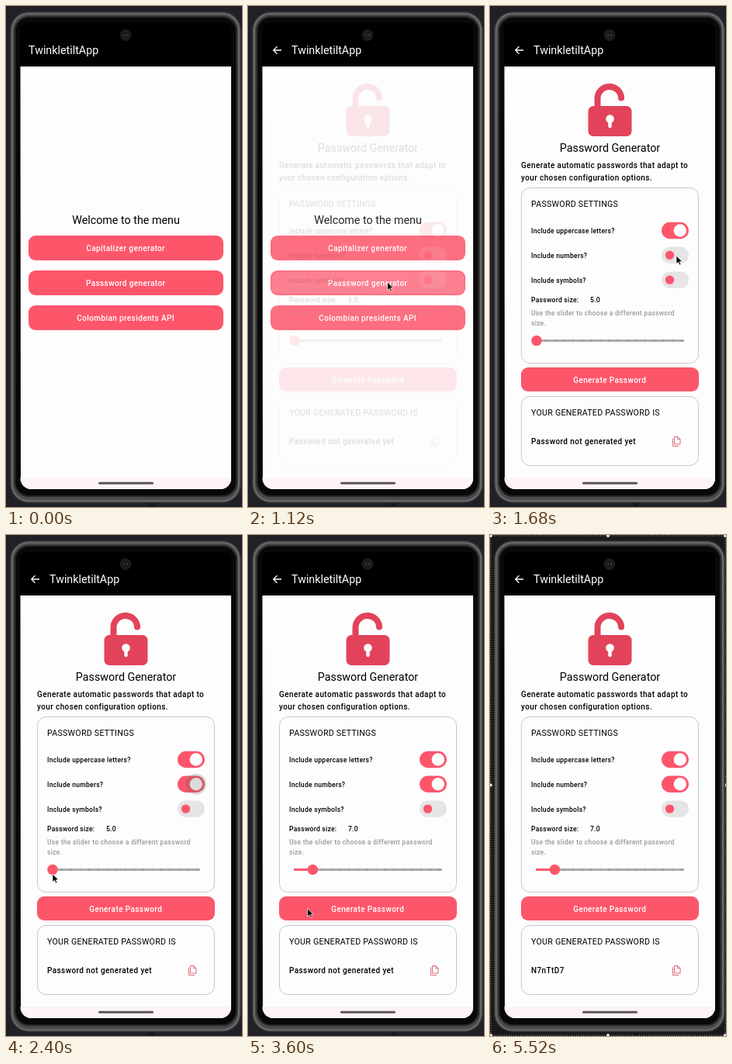
Recreate the animation shown at these times as an HTML page. Size 304 by 646 pixels, loop 5920 ms.

```html
<!DOCTYPE html>
<html lang="en">
<head>
<meta charset="utf-8">
<style>
html, body { margin: 0; width: 100%; height: 100%; overflow: hidden; background: #202027; }
svg { display: block; width: 304px; height: 646px; font-family: Roboto, sans-serif; }
.big { font-size: 14.3px; }
.body { font-size: 10px; font-weight: 500; letter-spacing: .39px; }
.caps { font-size: 10.7px; letter-spacing: .23px; }
.small { font-size: 8.6px; font-weight: 500; letter-spacing: .24px; }
.mid { text-anchor: middle; }
.white { fill: #fff; }
.accent { fill: #fd566b; }
.lock { fill: #e2435a; }
.card { fill: none; stroke: #777; stroke-width: .4; }
</style>
</head>
<body>
<svg viewBox="0 0 304 646">
  <rect width="304" height="646" fill="#202027"/>
  <g id="select">
    <rect width="304" height="646" fill="#191919"/>
    <rect x="1" y="1" width="302" height="644" fill="none" stroke="#555" stroke-width="2" stroke-dasharray="1 2"/>
    <g id="handles" fill="#e4e4e4"></g>
  </g>

  <!-- phone -->
  <path d="M7 150v7M301 150v7M184 643h7" stroke="#17171a" stroke-width="4"/>
  <rect x="5.5" y="7.5" width="297" height="633" rx="24" fill="#4a4a4a" stroke="#303030"/>
  <rect x="8" y="10" width="292" height="628" rx="21" fill="none" stroke="#707070" stroke-width="1.5"/>
  <rect x="11.5" y="14" width="285.5" height="618" rx="18" fill="#080808" stroke="#262626" stroke-width="2"/>
  <rect x="18" y="22" width="272" height="64" rx="8"/>
  <path d="M18.5 78H290V609a14 14 0 0 1-14 14H32.500a14 14 0 0 1-13.500-14Z" fill="#fdfdfd"/>
  <path d="M18.500 608H290V609a14 14 0 0 1-14 14H32.500a14 14 0 0 1-14-14Z" fill="#fdf3f9"/>
  <rect x="119" y="613.7" width="71" height="3" rx="1.5" fill="#5b585b"/>
  <circle cx="154" cy="37.5" r="7.5" fill="#1b1b1c"/>
  <path d="M151.5 37.5h1.5M155.5 37.5h1.5" stroke="#555" stroke-width="1.5"/>
  <text id="title" class="big white" y="62">TwinkletiltApp</text>
  <path id="back" d="M43 57H33M37.5 52.3L32.8 57L37.5 61.7" fill="none" stroke="#fff" stroke-width="1.3"/>

  <g id="menu">
    <text class="big mid" x="154.5" y="281">Welcome to the menu</text>
  </g>

  <g id="form">
    <path d="M138.5 133V120a15.3 15.3 0 0 1 30.6-1.500" fill="none" stroke="#e2435a" stroke-width="8" stroke-linecap="round"/>
    <rect class="lock" x="126.5" y="129" width="56" height="39" rx="6.500"/>
    <circle class="white" cx="154.5" cy="145.500" r="5.3"/>
    <path d="M154.5 147v8" stroke="#fff" stroke-width="4.5" stroke-linecap="round"/>
    <text class="big mid" x="154.5" y="187.5">Password Generator</text>
    <text class="body" x="40" y="209">Generate automatic passwords that adapt to</text>
    <text class="body" x="40" y="224.5">your chosen configuration options.</text>

    <rect class="card" x="40.5" y="234.5" width="228" height="226" rx="11"/>
    <text class="caps" x="53" y="259">PASSWORD SETTINGS</text>
    <g id="switches"></g>
    <text class="small" x="53" y="382">Password size:</text>
    <text id="size" class="small" x="129" y="382"></text>
    <g class="small" fill="#999">
      <text x="53" y="398.5">Use the slider to choose a different password</text>
      <text x="53" y="412">size.</text>
    </g>
    <path d="M59 431.5H250" stroke="#b0abac" stroke-width="2.8"/>
    <path d="M60 431.5H251" stroke="#858082" stroke-width="1.5" stroke-dasharray="1.5 10.1"/>
    <path id="fill" stroke="#fd566b" stroke-width="2.8"/>
    <circle id="knob" class="accent" cy="431.5" r="6.8"/>

    <rect class="card" x="40.5" y="503.5" width="228" height="89" rx="11"/>
    <text class="caps" x="53" y="528">YOUR GENERATED PASSWORD IS</text>
    <text id="result" class="body" x="53" y="565"></text>
    <path d="M237.5 555.5h4.5l3 3v6.5h-7.5ZM241.8 555.5v3.2h3.2M235.5 557.5v10h7.5" fill="none" stroke="#d9586b" stroke-width=".9"/>
  </g>

  <path id="cursor" d="M0 0V10.5L2.5 8.300L4.2 12L5.900 11.200L4.300 7.700H7.600Z" stroke="#fff" stroke-width=".7"/>
</svg>
<script>
const LOOP = 5920, STEP = 80;
const $ = id => document.getElementById(id);
const set = (el, attrs) => { for (const k in attrs) el.setAttribute(k, attrs[k]); };
const show = (el, on) => set(el, { visibility: on ? "visible" : "hidden" });
const make = (parent, tag, attrs, text = "") => {
  const el = document.createElementNS("http://www.w3.org/2000/svg", tag);
  set(el, attrs);
  el.textContent = text;
  return parent.appendChild(el);
};

// Progress from 0 to 1 between two times: straight, eased, and there-and-back
const ramp = (t, from, to) => Math.min(1, Math.max(0, (t - from) / (to - from)));
const ease = (t, from, to) => { const p = ramp(t, from, to); return p * p * (3 - 2 * p); };
const pulse = (t, from, to) => Math.sin(Math.PI * ramp(t, from, to));
const mix = (a, b, p) => `rgb(${a.map((v, i) => Math.round(v + (b[i] - v) * p))})`;

// Adds a button and returns its press highlight
function button(parent, x, y, w, h, label) {
  make(parent, "rect", { class: "accent", x, y, width: w, height: h, rx: 9 });
  const glow = make(parent, "rect", { class: "white", x: x + 1.5, y: y + 1.5, width: w - 3, height: h - 3, rx: 8 });
  make(parent, "text", { class: "body white mid", x: x + w / 2 - .3, y: y + h / 2 + 4 }, label);
  return glow;
}

const glows = ["Capitalizer generator", "Passsword generator", "Colombian presidents API"]
  .map((label, i) => button($("menu"), 29, 296 + 45 * i, 251, 32, label));
const menuGlow = glows[1];
glows.forEach(glow => set(glow, { opacity: 0 }));
const formGlow = button($("form"), 40, 466, 229, 31, "Generate Password");

const switches = ["uppercase letters", "numbers", "symbols"].map((name, i) => {
  const g = $("switches"), cy = 289.5 + 31.8 * i;
  make(g, "text", { class: "small", x: 53, y: cy + 3.5 }, `Include ${name}?`);
  return {
    rail: make(g, "rect", { x: 221, y: cy - 10.7, width: 35, height: 21.4, rx: 10.7 }),
    thumb: make(g, "circle", { cy }),
    halo: make(g, "circle", { cx: 244.7, cy, r: 13.5, fill: "#555", opacity: 0 })
  };
});

for (const cx of [1, 152, 303])
  for (const cy of [1, 322.5, 645]) make($("handles"), "circle", { cx, cy, r: 2 });

const RED = [253, 86, 107], GREY = [230, 228, 229], WHITE = [255, 255, 255];

// Pointer moves: leave, arrive, x, y
const MOVES = [
  [80, 560, 179.5, 356],
  [1120, 1280, 203.5, 351],
  [1280, 1600, 240, 322],
  [2080, 2400, 60, 437],
  [2560, 2880, 84, 437],
  [3120, 3440, 76.5, 481.5]
];

function pointer(t) {
  let px = 205, py = 391;
  for (const [from, to, x, y] of MOVES) {
    const p = ease(t, from, to);
    px += (x - px) * p;
    py += (y - py) * p;
  }
  return `translate(${px} ${py})`;
}

function draw(t) {
  const inForm = t >= 1040;
  set($("title"), { x: inForm ? 56 : 29 });
  show($("back"), inForm);
  set($("menu"), { opacity: 1 - ease(t, 1050, 1340) });
  set($("form"), { opacity: ease(t, 1040, 1400) });
  set(menuGlow, { opacity: .13 * pulse(t, 880, 1360) });
  set(formGlow, { opacity: .17 * pulse(t, 3600, 4080) });

  const flips = [1, ease(t, 1920, 2160), 0];
  switches.forEach(({ rail, thumb }, i) => {
    const p = flips[i];
    set(rail, { fill: mix(GREY, RED, p) });
    set(thumb, { cx: 231.5 + 13.3 * p, r: 5.7 + 2.5 * p, fill: mix(RED, WHITE, p) });
  });
  set(switches[1].halo, { opacity: .26 * (ease(t, 1840, 2000) - ease(t, 2320, 2640)) });

  const size = 5 + Math.round(2 * ease(t, 2560, 2880));
  const x = 60 + 11.7 * (size - 5);
  $("size").textContent = size.toFixed(1);
  set($("knob"), { cx: x });
  set($("fill"), { d: `M59 431.5H${x}` });
  $("result").textContent = t < 3840 ? "Password not generated yet" : "N7nTtD7";

  set($("cursor"), { transform: pointer(t) });
  show($("cursor"), t >= 80 && t < 4080);
  show($("select"), t >= 4960);
}

const start = performance.now();
function tick() {
  const t = (performance.now() - start) % LOOP;
  draw(Math.floor(t / STEP) * STEP);
  requestAnimationFrame(tick);
}
tick();
</script>
</body>
</html>
```
